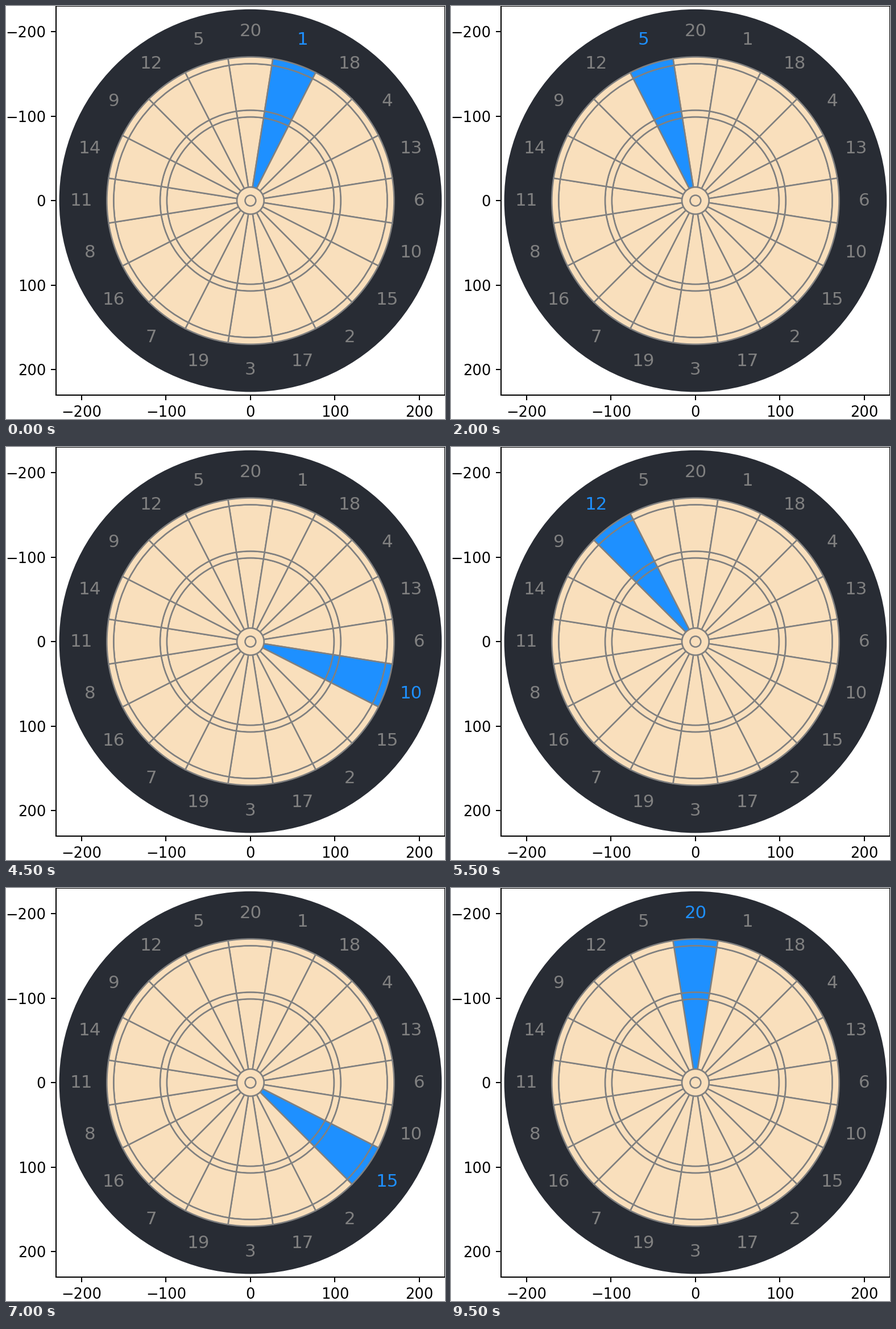
A matplotlib script for the animation above (10000 ms loop, 772 by 726 pixels).

```python
import math

import matplotlib.pyplot as plt
from matplotlib.animation import FuncAnimation
from matplotlib.patches import Circle, Wedge

WIDTH, HEIGHT, DPI = 772, 726, 185
LEFT, TOP, SIDE = 88.2, 0.4, 683.4

SECTORS = [20, 1, 18, 4, 13, 6, 10, 15, 2, 17, 3, 19, 7, 16, 8, 11, 14, 9, 12, 5]
RINGS = [(99, 16), (107, 99), (162, 107), (170, 162)]
STEP = 360 / len(SECTORS)

DARK, CREAM, GRAY, BLUE = "#282c34", "#f9dfbc", "#808080", "#1e90ff"

plt.rcParams["font.family"] = "DejaVu Sans"
fig = plt.figure(figsize=(WIDTH / DPI, HEIGHT / DPI), dpi=DPI, facecolor="white")
ax = fig.add_axes([LEFT / WIDTH, 1 - (TOP + SIDE) / HEIGHT, SIDE / WIDTH, SIDE / HEIGHT])
ax.set(xlim=(-230, 230), ylim=(230, -230))
ax.set_xticks(range(-200, 201, 100))
ax.set_yticks(range(-200, 201, 100))

ax.add_patch(Circle((0, 0), 225.5, facecolor=DARK, edgecolor=DARK))

segments, labels = {}, {}
for i, number in enumerate(SECTORS):
    angle = i * STEP - 90
    segments[number] = [
        ax.add_patch(Wedge((0, 0), outer, angle - STEP / 2, angle + STEP / 2,
                           width=outer - inner, facecolor=CREAM, edgecolor=GRAY))
        for outer, inner in RINGS
    ]
    theta = math.radians(angle)
    labels[number] = ax.text(200 * math.cos(theta), 200 * math.sin(theta), str(number),
                             color=GRAY, fontsize=12, ha="center", va="center")

for radius in (16, 6.35):
    ax.add_patch(Circle((0, 0), radius, facecolor=CREAM, edgecolor=GRAY))


def update(frame):
    """Highlight the sectors in numerical order."""
    for number in SECTORS:
        active = number == frame + 1
        for wedge in segments[number]:
            wedge.set_facecolor(BLUE if active else CREAM)
        labels[number].set_color(BLUE if active else GRAY)
    return list(labels.values())


anim = FuncAnimation(fig, update, frames=len(SECTORS), interval=500,
                     repeat=True, repeat_delay=0, blit=False)
plt.show()
```
